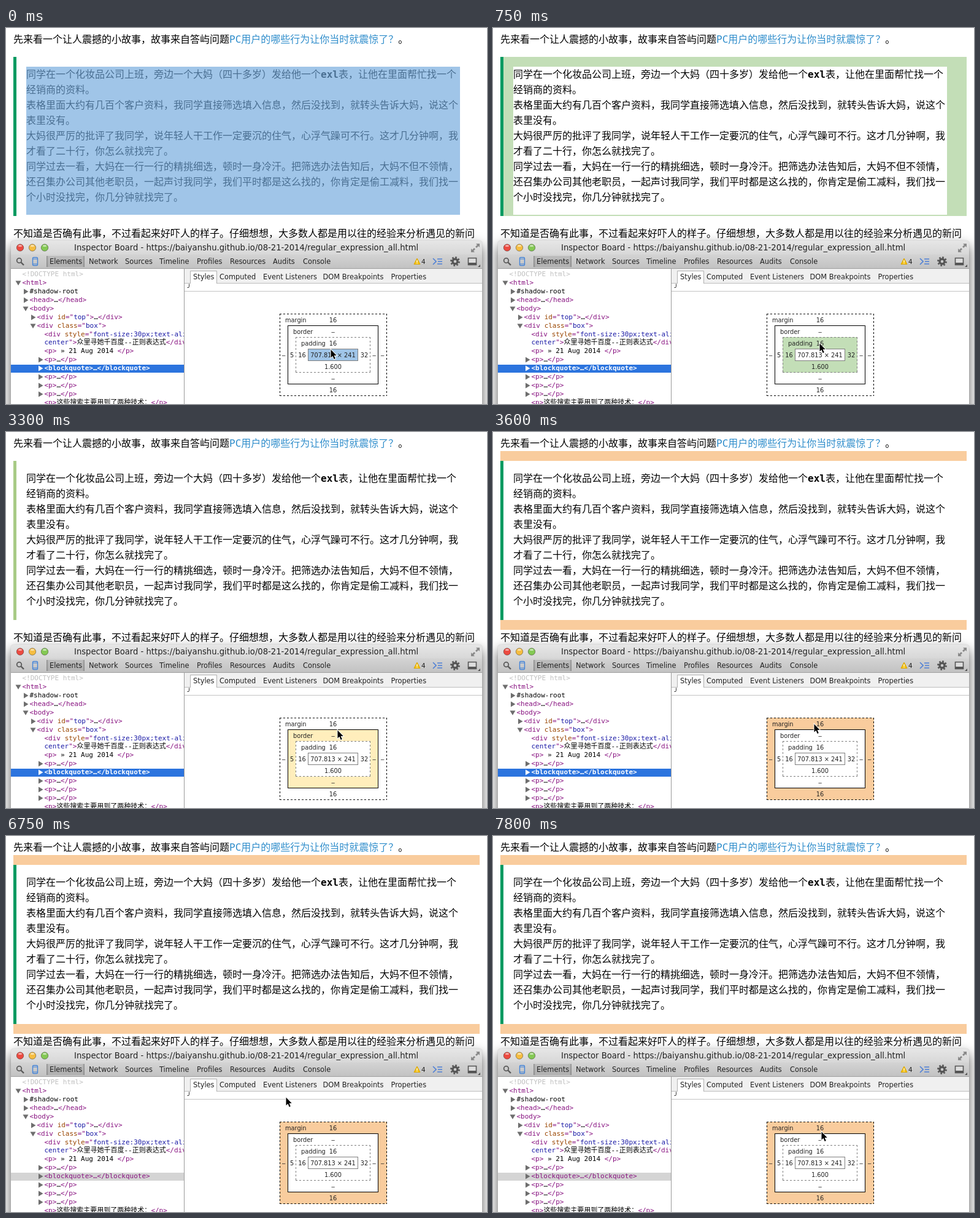
An HTML page that plays this animation: 784 by 612 pixels, repeating every 8000 ms.

```html
<!DOCTYPE html>
<html lang="zh-CN">
<head>
<meta charset="utf-8">
<title>Box model</title>
<style>
html, body { margin: 0; width: 100%; height: 100%; overflow: hidden; background: #fff; }
.stage {
  --margin: rgba(246,178,107,.66);
  --border: rgba(255,229,153,.66);
  --padding: rgba(147,196,125,.55);
  --content: rgba(111,168,220,.66);
  position: relative; width: 784px; height: 612px; overflow: hidden;
}
.stage > * { position: absolute; }
svg { left: 0; top: 0; width: 784px; height: 612px; }

.prose {
  left: 12px; margin: 0; white-space: nowrap; color: #000;
  font: 16px/25px "DejaVu Sans Mono", "Noto Sans CJK SC", "Noto Sans CJK", monospace;
}
.prose span { color: #2f8dcb; }
.quote { left: 12px; top: 47px; width: 5px; height: 259px; background: #009a61; }

.window {
  left: 8px; top: 346px; width: 768px; height: 280px; border-radius: 5px 5px 0 0;
  background: linear-gradient(#e6e6e6, #d8d8d8 22px, #d3d3d3 23px, #c2c2c2 45px, #fff 45px);
  box-shadow: 0 9px 20px rgba(0,0,0,.65), 0 0 1px rgba(0,0,0,.4);
}
.tree {
  left: 8px; top: 394px; width: 282px; height: 218px; overflow: hidden; white-space: pre; color: #881280;
  font: 11px/14px "DejaVu Sans Mono", "Noto Sans CJK SC", "Noto Sans CJK", monospace;
}
.tree div { height: 14px; padding-left: calc(18.5px + var(--d, 0) * 12px); }
.tree .wrapped { margin-top: -1px; }
.tree .picked { height: 13px; margin-top: 1px; line-height: 12px; }
.tree .doctype { color: #c0c0c0; }
.tree .text { color: #000; }
.tree .attr { color: #994500; }
.tree .value { color: #1a1aa6; }

text { font: 11.4px "DejaVu Sans", sans-serif; fill: #222; }
.title { font-size: 13.18px; }
.metrics text { font-size: 9.8px; }
.mid { text-anchor: middle; }
.dashes { fill: none; stroke-dasharray: 3 3; }
.arrows { fill: #6e6e6e; }

.loop, .picked, .picked-arrow { animation: 8s step-end infinite; }
.picked { animation-name: row; }
.picked-arrow { animation-name: arrow; }
@keyframes row {
  0% { background: #2c74de; color: #fff; font-weight: bold; }
  58.125%, 100% { background: #d4d4d4; color: #881280; font-weight: normal; }
}
@keyframes arrow { 0% { fill: #fff; } 58.125%, 100% { fill: #6e6e6e; } }

/* Highlights over the page */
.over-content { fill: var(--content); animation-name: over-content; }
.over-padding { fill: var(--padding); animation-name: over-padding; }
.over-border { fill: var(--border); animation-name: over-border; }
.over-margin { fill: var(--margin); animation-name: over-margin; }
@keyframes over-content { 0% { visibility: visible; } 9.375%, 100% { visibility: hidden; } }
@keyframes over-padding { 0%, 26.25%, 100% { visibility: hidden; } 9.375% { visibility: visible; } }
@keyframes over-border { 0%, 45%, 100% { visibility: hidden; } 26.25% { visibility: visible; } }
@keyframes over-margin { 0%, 86.25% { visibility: hidden; } 45%, 95.625%, 100% { visibility: visible; } }

/* Metrics boxes: one lit at a time, all lit while the pointer is away */
.box-margin { animation-name: box-margin; }
.box-border { animation-name: box-border; }
.box-padding { animation-name: box-padding; }
.box-content { animation-name: box-content; }
@keyframes box-margin { 0% { fill: #fff; } 43.125%, 100% { fill: var(--margin); } }
@keyframes box-border { 0%, 43.125%, 95.625%, 100% { fill: #fff; } 26.25%, 86.25% { fill: var(--border); } }
@keyframes box-padding { 0%, 26.25%, 95.625%, 100% { fill: #fff; } 9.375%, 86.25% { fill: var(--padding); } }
@keyframes box-content { 9.375%, 95.625%, 100% { fill: #fff; } 0%, 86.25% { fill: var(--content); } }

.pointer { animation-name: pointer; }
@keyframes pointer {
  0% { transform: translate(528px, 522px); }
  3.75% { transform: translate(526px, 524px); }
  7.5% { transform: translate(526px, 523px); }
  9.375% { transform: translate(531px, 512px); }
  11.25% { transform: translate(538px, 508px); }
  24.375% { transform: translate(548px, 501px); }
  26.25% { transform: translate(557px, 492px); }
  28.125% { transform: translate(558px, 491px); }
  41.25% { transform: translate(539px, 484px); }
  43.125% { transform: translate(530px, 476px); }
  45% { transform: translate(522px, 474px); }
  61.875% { transform: translate(537px, 474px); }
  84.375% { transform: translate(455px, 424px); }
  86.25% { transform: translate(407px, 405px); }
  88.125% { transform: translate(394px, 402px); }
  90% { transform: translate(385px, 400px); }
  91.875% { transform: translate(438px, 431px); }
  93.75% { transform: translate(491px, 463px); }
  95.625% { transform: translate(519px, 471px); }
  97.5%, 100% { transform: translate(534px, 480px); }
}
</style>
</head>
<body>
<div class="stage">
  <p class="prose" style="top:6px">先来看一个让人震撼的小故事，故事来自答屿问题<span>PC用户的哪些行为让你当时就震惊了？</span>。</p>
  <div class="quote"></div>
  <p class="prose" style="left:33px;top:63px">同学在一个化妆品公司上班，旁边一个大妈（四十多岁）发给他一个<b>exl</b>表，让他在里面帮忙找一个<br>经销商的资料。<br>表格里面大约有几百个客户资料，我同学直接筛选填入信息，然后没找到，就转头告诉大妈，说这个<br>表里没有。<br>大妈很严厉的批评了我同学，说年轻人干工作一定要沉的住气，心浮气躁可不行。这才几分钟啊，我<br>才看了二十行，你怎么就找完了。<br>同学过去一看，大妈在一行一行的精挑细选，顿时一身冷汗。把筛选办法告知后，大妈不但不领情，<br>还召集办公司其他老职员，一起声讨我同学，我们平时都是这么找的，你肯定是偷工减料，我们找一<br>个小时没找完，你几分钟就找完了。</p>
  <p class="prose" style="top:322px">不知道是否确有此事，不过看起来好吓人的样子。仔细想想，大多数人都是用以往的经验来分析遇见的新问</p>

  <svg viewBox="0 0 784 612">
    <path class="loop over-content" d="M33 63h707v241H33z"/>
    <path class="loop over-padding" fill-rule="evenodd" d="M17 47h755v259H17zM33 63h707v241H33z"/>
    <path class="loop over-border" d="M12 47h5v259h-5z"/>
    <path class="loop over-margin" d="M12 31h760v16H12zM12 306h760v16H12z"/>
  </svg>

  <div class="window"></div>

  <div class="tree"><div class="doctype">&lt;!DOCTYPE html&gt;</div><div>&lt;html&gt;</div><div class="text" style="--d:1">#shadow-root</div><div style="--d:1">&lt;head&gt;<span class="text">…</span>&lt;/head&gt;</div><div style="--d:1">&lt;body&gt;</div><div style="--d:2">&lt;div <span class="attr">id</span>="<span class="value">top</span>"&gt;<span class="text">…</span>&lt;/div&gt;</div><div style="--d:2">&lt;div <span class="attr">class</span>="<span class="value">box</span>"&gt;</div><div style="--d:3">&lt;div <span class="attr">style</span>="<span class="value">font-size:30px;text-align:</span></div><div class="wrapped" style="--d:3"><span class="value">center</span>"&gt;<span class="text">众里寻她千百度--正则表达式</span>&lt;/div&gt;</div><div style="--d:3">&lt;p&gt;<span class="text"> » 21 Aug 2014 </span>&lt;/p&gt;</div><div style="--d:3">&lt;p&gt;<span class="text">…</span>&lt;/p&gt;</div><div class="picked" style="--d:3">&lt;blockquote&gt;…&lt;/blockquote&gt;</div><div style="--d:3">&lt;p&gt;<span class="text">…</span>&lt;/p&gt;</div><div style="--d:3">&lt;p&gt;<span class="text">…</span>&lt;/p&gt;</div><div style="--d:3">&lt;p&gt;<span class="text">…</span>&lt;/p&gt;</div><div style="--d:3">&lt;p&gt;<span class="text">这些搜索主要用到了两种技术：</span>&lt;/p&gt;</div></div>

  <svg viewBox="0 0 784 612">
    <defs>
      <path id="closed" d="M-3-4.500 4.500 0-3 4.500z"/>
      <path id="open" d="M-4.500-3.500h9L0 4z"/>
      <linearGradient id="pressed">
        <stop stop-opacity=".34"/><stop offset=".05" stop-opacity=".1"/>
        <stop offset=".95" stop-opacity=".1"/><stop offset="1" stop-opacity=".34"/>
      </linearGradient>
    </defs>

    <!-- title bar -->
    <g stroke-opacity=".45" stroke="#000" stroke-width=".8">
      <circle cx="23" cy="357.500" r="5.700" fill="#ec4b41"/>
      <circle cx="43" cy="357.500" r="5.700" fill="#f5bd41"/>
      <circle cx="63" cy="357.500" r="5.700" fill="#84c954"/>
    </g>
    <g fill="#fff" opacity=".55">
      <ellipse cx="23" cy="354.500" rx="3" ry="1.600"/><ellipse cx="43" cy="354.500" rx="3" ry="1.600"/><ellipse cx="63" cy="354.500" rx="3" ry="1.600"/>
    </g>
    <text class="title" x="111" y="362">Inspector Board - https://baiyanshu.github.io/08-21-2014/regular_expression_all.html</text>
    <path d="M766 351h6v6l-2-2-3 3-2-2 3-3zM758 359l2 2 3-3 2 2-3 3 2 2h-6z" fill="#8a8a8a"/>

    <!-- toolbar -->
    <path d="M8 391.500h768" stroke="#a0a0a0"/>
    <path d="M66 371h62v18H66z" fill="url(#pressed)"/>
    <g fill="none" stroke="#5a5a5a" stroke-width="1.800">
      <circle cx="21.500" cy="378.500" r="3.800"/><path d="m24.500 381.500 4.500 4.500" stroke-width="2.400"/>
    </g>
    <g fill="none" stroke="#4484d8" stroke-width="1.400">
      <rect x="43.500" y="373.500" width="8" height="13" rx="1.500"/><path d="M44 376h7M44 384h7" stroke-width="1"/>
    </g>
    <text x="71" y="384">Elements</text><text x="135" y="384">Network</text>
    <text x="194" y="384">Sources</text><text x="250" y="384">Timeline</text>
    <text x="311" y="384">Profiles</text><text x="365" y="384">Resources</text>
    <text x="435" y="384">Audits</text><text x="484" y="384">Console</text>
    <path d="m670 375 5 9.500h-10z" fill="#f5c211" stroke="#d9a400" stroke-linejoin="round"/>
    <path d="M670 378v3.500m0 1v1.200" stroke="#fff" stroke-width="1.300"/>
    <text x="677" y="384" style="font-size:10.500px">4</text>
    <path d="m696 375 5 5-5 5M703 376h8M704 380h7M703 384h8" fill="none" stroke="#4c7fd6" stroke-width="1.600"/>
    <circle cx="732" cy="380" r="4" fill="none" stroke="#555" stroke-width="3.400"/>
    <circle cx="732" cy="380" r="6.600" fill="none" stroke="#555" stroke-width="2.600" stroke-dasharray="2.600 2.584"/>
    <path d="M753.500 374.500h13v11h-13z" fill="#ddd" stroke="#555" stroke-width="1.600"/>
    <path d="M753 382h14v4h-14zM769 389h4v-4z" fill="#555"/>

    <!-- side panes -->
    <path d="M291 392h485v23H291z" fill="#f0f0f0"/>
    <path d="M291 415.500h485" stroke="#bdbdbd"/>
    <path d="M300.500 416v-20.500h43V416" fill="#fff" stroke="#b0b0b0"/>
    <path d="M290.500 392v220" stroke="#9a9a9a"/>
    <path d="M291 428.500h485" stroke="#c4c4c4"/>
    <path d="M295.500 422.500h1.500q1.500 0 1.500-2v-4" fill="none" stroke="#333"/>
    <text x="305" y="409">Styles</text><text x="348" y="409">Computed</text>
    <text x="419" y="409">Event Listeners</text><text x="516.500" y="409">DOM Breakpoints</text>
    <text x="627.500" y="409">Properties</text>

    <g class="arrows">
      <use href="#open" x="20" y="415"/><use href="#closed" x="32" y="429"/>
      <use href="#closed" x="32" y="443"/><use href="#open" x="32" y="457"/>
      <use href="#closed" x="44" y="471"/><use href="#open" x="44" y="485"/>
      <use href="#closed" x="56" y="540"/><use href="#closed" x="56" y="568"/>
      <use href="#closed" x="56" y="582"/><use href="#closed" x="56" y="596"/>
      <use class="picked-arrow" href="#closed" x="56" y="554"/>
    </g>

    <!-- box metrics -->
    <g class="metrics">
      <path class="loop box-margin" d="M446 465h175v134H446z"/>
      <path class="dashes" d="M446 465.500h175M446 598.500h175M446.500 465v134M620.500 465v134" stroke="#000"/>
      <rect class="loop box-border" x="459.500" y="484.500" width="147" height="95" stroke="#000"/>
      <path class="loop box-padding" d="M472 503h122v58H472z"/>
      <path class="dashes" d="M472 503.500h122M472 560.500h122M472.500 503v58M593.500 503v58" stroke="#808080"/>
      <rect class="loop box-content" x="492.500" y="522.500" width="81" height="19" stroke="#808080"/>
      <text x="455" y="479">margin</text><text x="468" y="498">border</text><text x="481" y="517">padding</text>
      <g class="mid">
        <text x="533" y="479">16</text><text x="533" y="498">‒</text><text x="533" y="517">16</text>
        <text x="452.500" y="536">‒</text><text x="466" y="536">5</text><text x="482.500" y="536">16</text>
        <text x="533" y="536">707.813 × 241</text>
        <text x="584" y="536">32</text><text x="600" y="536">‒</text><text x="613.500" y="536">‒</text>
        <text x="533" y="555">1.600</text><text x="533" y="574">‒</text><text x="533" y="593">16</text>
      </g>
    </g>

    <g class="loop pointer">
      <path d="M1.500 1.500v13l3-2.800 2.200 5.300 2.100-.9-2.200-5.100h4.100z" stroke="#fff" stroke-width="1.800" paint-order="stroke"/>
    </g>
  </svg>
</div>
</body>
</html>
```
